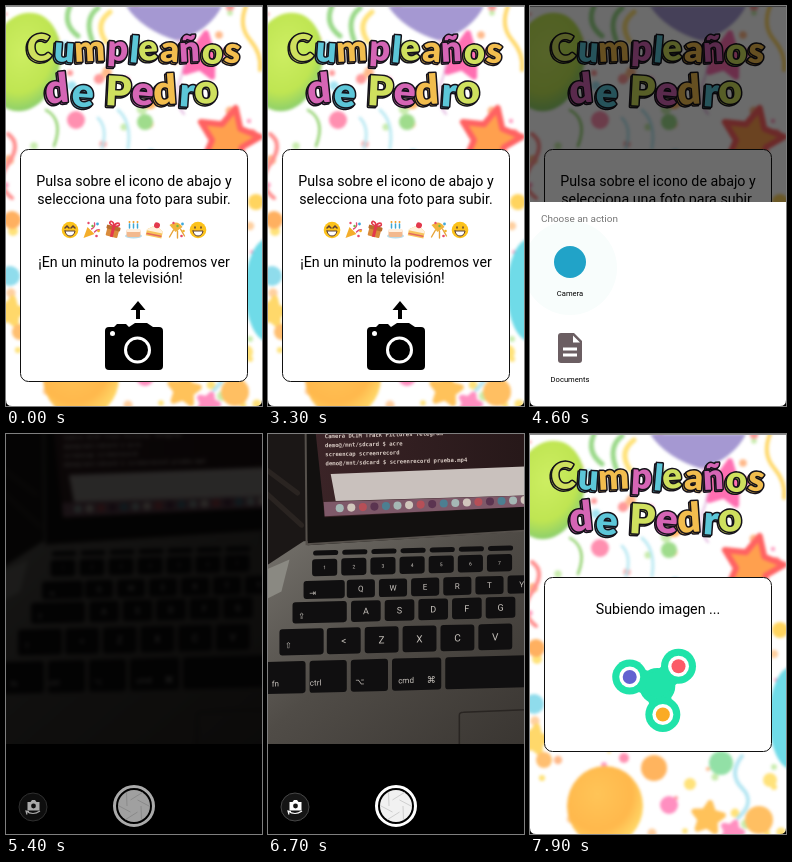
Animation of 256 by 400 pixels, one loop 8000 ms. Source, as an HTML page:

```html
<!DOCTYPE html>
<html lang="es">
<head>
<meta charset="utf-8">
<title>Cumpleaños</title>
<style>
html, body { margin: 0; width: 100%; height: 100%; overflow: hidden; background: #000; }
svg { display: block; width: 256px; height: 400px; font-family: Roboto, sans-serif; }
.title { font: 900 35px Lato, sans-serif; letter-spacing: 1px; text-anchor: middle;
  stroke: #15121a; stroke-width: 3px; stroke-linejoin: round; paint-order: stroke; }
.body { font-size: 14.22px; text-anchor: middle; }
.app { font-size: 7.6px; text-anchor: middle; }
.keys text { fill: #c9c4be; text-anchor: middle; }
.term { font: 700 5.6px "DejaVu Sans Mono", monospace; fill: #d8cbc4; white-space: pre; }
</style>
</head>
<body>
<svg viewBox="0 0 256 400">
  <defs>
    <linearGradient id="deck" x1="0" y1="0" x2="1" y2="1">
      <stop offset="0" stop-color="#77746e"/>
      <stop offset=".45" stop-color="#504c47"/>
      <stop offset="1" stop-color="#37332f"/>
    </linearGradient>
    <linearGradient id="glass" x1="0" y1="0" x2="1" y2="0">
      <stop offset="0" stop-color="#3b2427"/>
      <stop offset="1" stop-color="#251718"/>
    </linearGradient>
    <radialGradient id="green" cx=".45" cy=".4" r=".6">
      <stop offset="0" stop-color="#cdee62"/>
      <stop offset=".7" stop-color="#bfe552"/>
      <stop offset="1" stop-color="#8fd06a"/>
    </radialGradient>
    <radialGradient id="amber" cx=".4" cy=".35" r=".65">
      <stop offset="0" stop-color="#ffc457"/>
      <stop offset=".7" stop-color="#ffb84c"/>
      <stop offset="1" stop-color="#ffd666"/>
    </radialGradient>
    <clipPath id="photoClip"><rect width="256" height="310"/></clipPath>
  </defs>

  <g id="page">
    <rect width="256" height="400" fill="#fff"/>
    <g id="party" style="filter:blur(1.6px)"></g>
    <g id="title"></g>
    <rect id="card" x="14.5" y="143.5" width="227" height="232" rx="8" fill="#fff" stroke="#111"/>
    <g id="invite">
      <g class="body">
        <text x="128" y="180">Pulsa sobre el icono de abajo y</text>
        <text x="128" y="197.500">selecciona una foto para subir.</text>
        <text x="128" y="260.500">¡En un minuto la podremos ver</text>
        <text x="128" y="277">en la televisión!</text>
      </g>
      <g id="emoji"></g>
      <path d="M132 295l7.500 9h-5.500v9h-4v-9h-5.500z"/>
      <path d="M103 321h5l3-3h9l3 3 6-4h12l6 4h6q4 0 4 4v35q0 4-4 4h-50q-4 0-4-4v-35q0-4 4-4z"/>
      <circle cx="131.500" cy="344" r="12" fill="none" stroke="#fff" stroke-width="3"/>
      <circle cx="106.500" cy="327.500" r="2.500" fill="#fff"/>
    </g>
    <g id="upload">
      <text class="body" x="128" y="180">Subiendo imagen ...</text>
      <g id="spinner"></g>
    </g>
    <rect width="256" height="1" fill="#8c8c8c"/>
  </g>

  <rect id="dim" width="256" height="400"/>

  <g id="sheet">
    <rect y="196" width="256" height="204" fill="#fff"/>
    <circle id="ripple" cx="40" cy="262" r="47" fill="#f8fdfc"/>
    <text x="11" y="216" font-size="9.950" fill="#757575">Choose an action</text>
    <circle cx="40" cy="256" r="16" fill="#21a3c8"/>
    <text class="app" x="40" y="290">Camera</text>
    <path d="M31 327h13l8 8v19q0 3-3 3H31q-3 0-3-3v-24q0-3 3-3z" fill="#6b5e62"/>
    <path d="M43 329.500v7h7zM33 341.500h14v3H33zM33 347.500h14v3H33z" fill="#fff"/>
    <text class="app" x="40" y="376">Documents</text>
  </g>

  <path d="M0 394v6h6q-6 0-6-6zM256 394v6h-6q6 0 6-6z"/>

  <g id="camera">
    <rect width="256" height="400"/>
    <g clip-path="url(#photoClip)"><g id="photo"></g></g>
    <g id="focus" fill="none" stroke="#dcab2c">
      <circle cx="128" cy="139" r="19.500" stroke-width="1.200"/>
      <path d="M121 136v-4h4M131 132h4v4M135 142v4h-4M125 146h-4v-4" stroke-width="1"/>
    </g>
    <g id="controls">
      <circle cx="128" cy="372" r="19.500" fill="none" stroke="#fff" stroke-width="3"/>
      <circle cx="128" cy="372" r="16" fill="#f1f1f1"/>
      <g id="blades" stroke="#cfcfcf" stroke-width="1"></g>
      <circle cx="27" cy="373" r="14" fill="#151515" stroke="#474747"/>
      <path d="M21.500 368h3l1.500-2h3l1.500 2h3v8.500h-12z" fill="#fff"/>
      <circle cx="27.500" cy="372" r="2.400" fill="#151515"/>
      <path d="M20 377q7 5 14 0M21 380.500l-1-3.500 3 .5" fill="none" stroke="#fff" stroke-width="1.200"/>
    </g>
  </g>
</svg>

<script>
const $ = id => document.getElementById(id);
const fill = (id, parts) => $(id).innerHTML = parts.flat().join('');
const dot = (x, y, r, c, ry = r) => `<ellipse cx="${x}" cy="${y}" rx="${r}" ry="${ry}" fill="${c}"/>`;
const box = (x, y, w, h, c, rx = 0) => `<rect x="${x}" y="${y}" width="${w}" height="${h}" rx="${rx}" fill="${c}"/>`;
const path = (d, c) => `<path d="${d}" fill="${c}"/>`;
const line = (d, c, w) => `<path d="${d}" fill="none" stroke="${c}" stroke-width="${w}" stroke-linecap="round"/>`;
const at = (x, y, parts, turn = 0) => `<g transform="translate(${x} ${y}) rotate(${turn})">${parts.join('')}</g>`;
const polar = (r, deg) => [r * Math.cos(deg * Math.PI / 180), r * Math.sin(deg * Math.PI / 180)];

function star(x, y, r, c, turn = 0, edge = c) {
  const pts = Array.from({ length: 10 }, (_, i) => {
    const [dx, dy] = polar(i % 2 ? r * .5 : r, i * 36 - 90 + turn);
    return `${(x + dx).toFixed(1)},${(y + dy).toFixed(1)}`;
  });
  return `<polygon points="${pts.join(' ')}" fill="${c}" stroke="${edge}" stroke-width="6" stroke-linejoin="round"/>`;
}

// Small confetti from a seeded generator
let seed = 11;
const rnd = () => (seed = seed * 16807 % 2147483647) / 2147483647;
const tints = ['#ff9fc0', '#ffe27a', '#a5e4f2', '#ffb98a', '#c9ecae', '#ff9a9a', '#ffd0a0'];
const confetti = Array.from({ length: 95 }, (_, i) =>
  dot((rnd() * 256).toFixed(), (rnd() * 400).toFixed(), (1.5 + rnd() * 4).toFixed(1), tints[i % 7]));

fill('party', [
  confetti,
  at(18, 56, [dot(0, 0, 36, 'url(#green)', 50)], 14),
  path('M120 0Q136 24 172 35Q204 24 216 0z', '#a598d2'),
  line('M172 34q10 20 2 40t4 34', '#e3b9e0', 2),
  line('M40 104q18 10 8 36', '#8fd06a', 2.5),
  line('M64 0q-8 18 8 30M92 2q-14 10-6 32', '#9bd98a', 5),
  line('M104 6q-16 12-4 30', '#ffe27a', 5),
  line('M112 104q14 12 10 38M92 112q10 10 4 30', '#bdeaf3', 3),
  line('M2 128q14 10 0 30t4 34', '#ff8f8f', 4),
  line('M240 0q-8 20 4 34t10 30', '#ffd86a', 4),
  star(196, 50, 23, '#ff6fb2', 10),
  star(222, 133, 32, '#ffa04e', 14, '#ff6262'),
  dot(70, 114, 9, '#ff8fb0'), dot(139, 116, 8, '#9fdc8c'), dot(144, 96, 7, '#ffb45e'),
  dot(6, 214, 9, '#ffb060'), dot(4, 270, 10, '#8fdcec'), dot(250, 196, 8, '#ffd45e'),
  dot(263, 284, 24, '#6fdbe8', 52),
  star(4, 306, 14, '#ffd86a', 12),
  dot(14, 326, 8, '#ffbf70'), dot(94, 324, 5, '#ff8fb0'),
  dot(75, 372, 38, 'url(#amber)', 40),
  dot(124, 334, 13, '#ffb45e'), dot(191, 329, 12, '#92e0a6'), dot(139, 371, 9, '#ff8fc0'),
  dot(160, 350, 6, '#ffe27a'), dot(229, 386, 14, '#ffbf62'), dot(240, 346, 7, '#ffe27a'),
  star(178, 384, 15, '#ffc25a', 8),
  star(202, 398, 10, '#ff8fc0', 20),
  line('M212 322q-14 18 0 32t-4 30', '#b5e6f2', 4),
]);

const hues = { g: '#cfe05e', c: '#5cc6d8', o: '#f2bd4e', p: '#d565b5' };
function heading(text, x, y, size, colors, bumps) {
  let used = 0, prev = 0;
  const glyphs = [...text].map((ch, i) => {
    if (ch === ' ') return ' ';
    const lift = +bumps[i] - 2, dy = lift - prev;
    prev = lift;
    return `<tspan dy="${dy}" fill="${hues[colors[used++]]}">${ch}</tspan>`;
  }).join('');
  const layer = extra => `<text class="title" x="${x}" y="${y}" style="font-size:${size}px" rotate="-6 4 -3 3 5 -4 4 -3 4 6" ${extra}>${glyphs}</text>`;
  return layer('transform="translate(-1.3 1.6)"') + layer('');
}
fill('title', [
  heading('Cumpleaños', 128.5, 56, 36.3, 'gcopcgopgo', '2120211232'),
  heading('de Pedro', 127, 99, 41, 'pcgpocg', '13021231'),
]);

// Emoji row, each drawn around its own centre
const face = (eyes, mouth) => [dot(0, 0, 8.3, '#fcc21b'), line(eyes, '#5d4037', 1.5), path(mouth, '#fff'),
  line(mouth, '#5d4037', 1)];
const bits = [dot(-3, -7, 1.2, '#e64a6b'), dot(6, -6, 1.4, '#40a9dc'), dot(7, 1, 1.3, '#f3b226'),
  dot(1, -4, 1.2, '#73b845'), dot(5, 6, 1.3, '#e64a6b')];
fill('emoji', [
  at(64, 224, face('M-5-2l2-2 2 2M1-2l2-2 2 2', 'M-5 1h10q-1 5-5 5t-5-5z')),
  at(85.5, 224, [path('M-8 8l4-11 7 7z', '#f4ae2b'), line('M0-1q4-2 3-6M3 2q3-3 5-2', '#df4d77', 1.4), ...bits]),
  at(107, 224, [box(-6, -2, 12, 9, '#d98b3b', 1), box(-7, -4, 14, 4, '#b96d2c', 1), box(-1.5, -4, 3, 11, '#e3394c'),
    line('M0-4q-7-1-4-4 3 0 4 4 1-4 4-4 3 3-4 4', '#e3394c', 1.6)], 14),
  at(127.5, 224, [dot(0, 6, 8.5, '#b8dbe8', 2.5), box(-7, -1, 14, 8, '#f2b98e', 2), box(-7, -1, 14, 3, '#fff0df', 1),
    line('M-4-2v-4M0-2v-4M4-2v-4', '#3fa6d2', 1.5), line('M-4-8v0M0-8v0M4-8v0', '#f39a26', 2)]),
  at(149, 224, [path('M-8 1l8-6 8 5v7H-8z', '#f7c45c'), path('M-8 1l8-6 8 5v2H-8z', '#fff1dc'),
    line('M-7 5H7', '#e46a5e', 1.5), dot(1, -5, 3, '#e3394c')], 12),
  at(170.5, 224, [path('M-7-5q8-6 13 2l-7 5z', '#f1b43c'), line('M-3 0l-4 7M1 1l0 7M4-1l4 7', '#e6a33a', 1.4), ...bits]),
  at(192, 224, face('M-3-3v1M3-3v1', 'M-5 1h10q-1 5-5 5t-5-5z')),
]);

const lobes = [[79, '#fbab24'], [198, '#6262d0'], [317, '#fb5b68']].map(([deg, c]) => [...polar(29, deg), c]);
fill('spinner', [
  dot(0, 0, 18, '#20e3a9'),
  lobes.map(([x, y]) => line(`M0 0L${x} ${y}`, '#20e3a9', 23) + dot(x, y, 17.5, '#20e3a9')),
  lobes.map(([x, y, c]) => dot(x, y, 10.5, '#fff') + dot(x, y, 7, c)),
]);

fill('blades', [0, 60, 120, 180, 240, 300].map(a =>
  `<path d="M${polar(7, a)}L${polar(16, a + 62)}" transform="translate(128 372)"/>`));

// Keyboard rows: centre y, height, first label x, pitch, label size, labels, wide key at the left
const rows = [
  [121, 5, 58, 29, 0, [..."       "], null],
  [135.5, 17, 57, 29, 5, [...'1234567'], null],
  [157.5, 18, 93, 32, 8, [...'QWERTY'], [36, 41, '⇥']],
  [180, 21, 98, 33.5, 9, [...'ASDFG'], [25, 54, '⇪']],
  [209, 26, 76, 37.7, 10, [...'<ZXCV'], [12, 44, '⇧']],
];
const key = (x, y, w, h) => box(x, y - h / 2, w, h, '#100f10', 3);
const label = (x, y, size, s) => `<text x="${x}" y="${y + size * .35}" font-size="${size}">${s.replace('<', '&lt;')}</text>`;
const keyRow = ([y, h, x0, step, size, names, wide]) => [
  wide ? key(wide[0], y, wide[1], h) + label(wide[0] + 9, y + 3, 8, wide[2]) : '',
  names.map((s, i) => key(x0 + i * step - step / 2 + 2, y, step - 4, h) + (size ? label(x0 + i * step, y, size, s) : '')),
].flat().join('');
const lastRow = [[-6, 44, 8, 'fn'], [42, 37, 48, 'ctrl'], [83, 37, 92, '⌥'], [124, 49, 138, 'cmd'], [177, 90, 0, '']]
  .map(([x, w, tx, s]) => key(x, 244, w, 32) + label(tx, 250, 8, s)).join('') + label(163, 250, 9, '⌘');
const shell = ['Camera     DCIM  Track  Pictures      Telegram', 'demo@/mnt/sdcard $ acre',
  'screencap       screenrecord', 'demo@/mnt/sdcard $ screenrecord prueba.mp4'];

fill('photo', [
  box(-10, -10, 276, 330, '#1b1716'),
  line('M-10 30L30 60M-10 52L34 92', '#2a2421', 5),
  path('M-10 138L36 108 256 96 266 330H-10z', 'url(#deck)'),
  path('M-10 140L22 126 14 158-10 170z', '#8a8982'),
  path('M38-10L270-10V97L40 112z', '#12100f'),
  line('M38-6L39 111 264 97', '#55504b', 2),
  path('M47-10H270V73L57 84z', 'url(#glass)'),
  path('M63 41L270 33V62L68 68z', '#c9c1bd'),
  path('M56 69L270 62V73L57 83z', '#7e5969'),
  Array.from({ length: 17 }, (_, i) => dot(72 + i * 11.5, 75 - i * .5, 4, ['#a5b8b5', '#b64f57', '#4c7f91', '#d1c7bc', '#5b3450'][i * 3 % 5])),
  '<g class="term" transform="rotate(-1.5)">',
  shell.map((s, i) => `<text x="57" y="${7 + i * 9}">${s}</text>`),
  '</g><g class="keys" transform="skewY(-1.5)">',
  rows.map(keyRow), lastRow,
  '</g>',
  line('M191 320V281Q191 278 195 278L270 275', '#292522', 1.5),
]);

// Keyed values, linear between entries: [ms, value]
const tracks = {
  sheet: [[3300, 0], [3400, .35], [3500, .8], [3600, 1]],
  ripple: [[4400, 0], [4500, .6], [4600, 1]],
  camera: [[4600, 0], [4700, .6], [4800, 1], [7600, 1], [7700, .45], [7800, 0]],
  controls: [[5200, 0], [5500, 1], [6900, 1], [7000, 0]],
  photo: [[5300, 0], [5800, 1]],
  focus: [[5800, 0], [6000, 1], [6500, 1], [6700, 0]],
  blur: [[5300, 2.4], [6200, 1.1], [6900, 0]],
  light: [[7000, 1], [7100, .4], [7200, .52], [7500, 1]],
  drift: [[6200, 0], [7000, 1]],
};
function value(name, t) {
  const k = tracks[name], n = k.findIndex(p => p[0] > t);
  if (n < 0) return k[k.length - 1][1];
  if (n === 0) return k[0][1];
  const [[t0, a], [t1, b]] = [k[n - 1], k[n]];
  return a + (b - a) * (t - t0) / (t1 - t0);
}

const LOOP = 8000, STEP = 100;
const start = performance.now();
function draw() {
  const t = Math.floor((performance.now() - start) % LOOP / STEP) * STEP;
  const v = name => value(name, t);
  const uploading = t >= 7700;
  const open = uploading ? 0 : v('sheet');

  $('card').setAttribute('height', uploading ? 174 : 232);
  $('invite').style.display = uploading ? 'none' : '';
  $('upload').style.display = uploading ? '' : 'none';
  $('spinner').setAttribute('transform', `translate(127.3 252) rotate(${(t - 7900) * .36})`);

  $('dim').style.opacity = open * .58;
  $('sheet').setAttribute('transform', `translate(0 ${(1 - open) * 204})`);
  for (const id of ['ripple', 'camera', 'controls', 'photo', 'focus']) $(id).style.opacity = v(id);

  const d = v('drift');
  $('photo').style.filter = `blur(${v('blur')}px) brightness(${v('light')})`;
  $('photo').setAttribute('transform', `translate(${-d} ${-2 * d}) scale(${1 + d * .008})`);
  requestAnimationFrame(draw);
}
draw();
</script>
</body>
</html>
```
